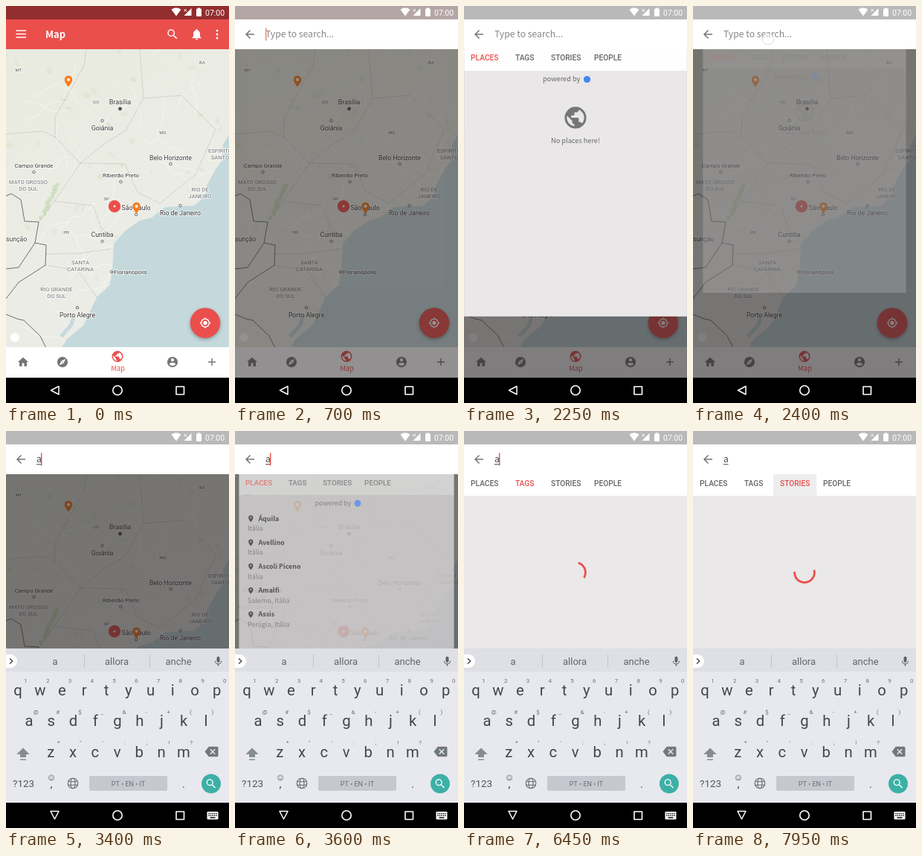
An HTML page with a canvas for the animation above (8 s loop, 300x533 px).

```html
<!DOCTYPE html>
<html lang="en">
<head>
<meta charset="utf-8">
<title>Map search</title>
<style>
html, body { margin: 0; width: 100%; height: 100%; overflow: hidden; background: #000; }
canvas { display: block; width: 300px; height: 533px; }
</style>
</head>
<body>
<canvas id="stage"></canvas>
<script>
const W = 300, H = 533, LOOP = 8000;
const cv = document.getElementById('stage');
const dpr = window.devicePixelRatio || 1;
cv.width = W * dpr;
cv.height = H * dpr;
const c = cv.getContext('2d');

const SANS = '"Noto Sans CJK JP", "Noto Sans CJK SC", "Noto Sans CJK", "Noto Sans", sans-serif';
const ROBO = 'Roboto, "Liberation Sans", sans-serif';
const RED = '#ea4f4c', GREY = '#757575', SHEET = '#eae8e9', INK = '#43464c', SEA = '#c5d9dd';

const ICONS = {
  search: 'M15.5 14h-.79l-.28-.27A6.47 6.47 0 0 0 16 9.5 6.5 6.5 0 1 0 9.5 16c1.61 0 3.09-.59 4.23-1.57l.27.28v.79l5 4.99L20.49 19l-4.99-5zm-6 0a4.5 4.5 0 1 1 0-9 4.5 4.5 0 0 1 0 9z',
  bell: 'M12 22a2 2 0 0 0 2-2h-4a2 2 0 0 0 2 2zm6-6v-5c0-3.07-1.64-5.64-4.5-6.32V4a1.5 1.5 0 0 0-3 0v.68C7.63 5.36 6 7.92 6 11v5l-2 2v1h16v-1z',
  home: 'M10 20v-6h4v6h5v-8h3L12 3 2 12h3v8z',
  compass: 'M12 10.9a1.1 1.1 0 1 0 0 2.2 1.1 1.1 0 0 0 0-2.2zM12 2a10 10 0 1 0 0 20 10 10 0 0 0 0-20zm2.19 12.19L6 18l3.81-8.19L18 6z',
  globe: 'M12 2a10 10 0 1 0 0 20 10 10 0 0 0 0-20zm-1 17.93A8 8 0 0 1 4.21 10.21L9 15v1c0 1.1.9 2 2 2zm6.9-2.54c-.26-.81-1-1.39-1.9-1.39h-1v-3c0-.55-.45-1-1-1H8v-2h2c.55 0 1-.45 1-1V7h2c1.1 0 2-.9 2-2v-.41a8 8 0 0 1 2.9 12.8z',
  user: 'M12 2a10 10 0 1 0 0 20 10 10 0 0 0 0-20zm0 3a3 3 0 1 1 0 6 3 3 0 0 1 0-6zm0 14.2c-2.5 0-4.71-1.28-6-3.22.03-1.99 4-3.08 6-3.08s5.97 1.09 6 3.08c-1.29 1.94-3.5 3.22-6 3.22z',
  plus: 'M19 13h-6v6h-2v-6H5v-2h6V5h2v6h6z',
  locate: 'M12 8a4 4 0 1 0 0 8 4 4 0 0 0 0-8zm8.94 3A9 9 0 0 0 13 3.06V1h-2v2.06A9 9 0 0 0 3.06 11H1v2h2.06A9 9 0 0 0 11 20.94V23h2v-2.06A9 9 0 0 0 20.94 13H23v-2zM12 19a7 7 0 1 1 0-14 7 7 0 0 1 0 14z',
  back: 'M20 11H7.83l5.59-5.59L12 4l-8 8 8 8 1.41-1.41L7.83 13H20z',
  pin: 'M12 2a7 7 0 0 0-7 7c0 5.25 7 13 7 13s7-7.75 7-13a7 7 0 0 0-7-7zm0 9.5a2.5 2.5 0 0 1 0-5 2.5 2.5 0 0 1 0 5z',
  mic: 'M12 14a3 3 0 0 0 3-3V5a3 3 0 0 0-6 0v6a3 3 0 0 0 3 3zm5.3-3a5.3 5.3 0 0 1-10.6 0H5c0 3.41 2.72 6.23 6 6.72V21h2v-3.28c3.28-.48 6-3.3 6-6.72z',
  erase: 'M22 3H7L0 12l7 9h15a2 2 0 0 0 2-2V5a2 2 0 0 0-2-2zm-3 12.6L17.6 17 14 13.4 10.4 17 9 15.6l3.6-3.6L9 8.4 10.4 7l3.6 3.6L17.6 7 19 8.4 15.4 12z',
  wifi: 'M12 21 24 5C20 2 16 1 12 1S4 2 0 5z',
  signal: 'M2 22h20V2z',
  shift: 'M12 3 1 14h6v5h10v-5h6zM7 22h10v2H7z'
};
for (const k in ICONS) ICONS[k] = new Path2D(ICONS[k]);

const clamp = v => Math.max(0, Math.min(1, v));
const ramp = (t, a, b) => clamp((t - a) / (b - a));
const out = p => 1 - (1 - p) ** 3;

// cubic-bezier(.4, 0, .2, 1)
function ease(x) {
  let lo = 0, hi = 1, s = x;
  for (let i = 0; i < 18; i++) {
    s = (lo + hi) / 2;
    const bx = 1.2 * s * (1 - s) ** 2 + 0.6 * s * s * (1 - s) + s ** 3;
    if (bx < x) lo = s; else hi = s;
  }
  return 3 * s * s * (1 - s) + s ** 3;
}

function rect(x, y, w, h, color) {
  c.fillStyle = color;
  c.fillRect(x, y, w, h);
}
function disc(x, y, r, fill, stroke, lw = 1) {
  c.beginPath();
  c.arc(x, y, r, 0, 7);
  if (fill) { c.fillStyle = fill; c.fill(); }
  if (stroke) { c.strokeStyle = stroke; c.lineWidth = lw; c.stroke(); }
}
function round(x, y, w, h, r, color) {
  c.beginPath();
  c.roundRect(x, y, w, h, r);
  c.fillStyle = color;
  c.fill();
}
function icon(name, x, y, size, color) {
  c.save();
  c.translate(x - size / 2, y - size / 2);
  c.scale(size / 24, size / 24);
  c.fillStyle = color;
  c.fill(ICONS[name], 'evenodd');
  c.restore();
}
function text(s, x, y, size, color, font = ROBO, align = 'left', weight = 400) {
  c.font = `${weight} ${size}px ${font}`;
  c.textAlign = align;
  c.fillStyle = color;
  c.fillText(s, x, y);
}
function line(pts, color, lw) {
  c.beginPath();
  pts.forEach(p => c.lineTo(...p));
  c.strokeStyle = color;
  c.lineWidth = lw;
  c.stroke();
}

// Key points of the map
const COAST = [[301, 171], [292, 186], [291, 207], [282, 219], [270, 241], [268, 255], [253, 268], [214, 270],
  [196, 284], [180, 288], [160, 302], [145, 319], [143, 356], [139, 375], [122, 391], [104, 429], [82, 447], [74, 460]];
const FRONTIERS = [
  [[0, 255], [7, 252], [20, 260], [25, 289], [44, 290], [39, 318], [17, 351], [0, 353]],
  [[39, 318], [54, 321], [53, 348], [17, 371], [0, 393]],
  [[0, 414], [15, 420], [24, 422], [46, 443], [54, 459]]
];
const STATES = [
  [[0, 172], [49, 168], [66, 176], [100, 211], [65, 262], [44, 290]],
  [[66, 176], [66, 150], [105, 80], [108, 58]],
  [[100, 211], [134, 184], [161, 167], [185, 124], [180, 58]],
  [[100, 211], [160, 212], [177, 250], [207, 265], [255, 226], [282, 166], [236, 120], [185, 124]],
  [[65, 262], [117, 268], [129, 300], [150, 311]],
  [[54, 333], [100, 332], [141, 326]],
  [[53, 348], [97, 355], [122, 391]]
];
// name, x, dot y, label baseline offset, size
const CITIES = [
  ['Brasília', 153.5, 138, -6, 9], ['Goiânia', 129.5, 154, 13, 8.8], ['Belo Horizonte', 221.5, 212, -5, 8.7],
  ['Campo Grande', 37.5, 223, -6, 7.8], ['Ribeirão Preto', 154.5, 236, -6, 7.8], ['São Paulo', 175, 280, -6, 8.7],
  ['Rio de Janeiro', 234.5, 268, 13, 8.7], ['Curitiba', 129.5, 316, -6, 8.7], ['Porto Alegre', 96, 405, 13, 8.7]
];
const REGIONS = [['MATO GROSSO', 'DO SUL', 30, 239], ['ESPÍRITO', 'SANTO', 288, 197], ['RIO DE', 'JANEIRO', 261, 249],
  ['SANTA', 'CATARINA', 100, 347], ['RIO GRANDE', 'DO SUL', 68, 383]];
const CODES = [['MT', 17, 88], ['GO', 121, 131], ['BA', 264, 78], ['MG', 211, 172], ['SP', 135, 261], ['PR', 81, 305.5]];

function drawLand() {
  rect(0, 58, W, 400, SEA);
  c.save();
  c.beginPath();
  c.rect(0, 58, W, 400);
  c.clip();
  c.beginPath();
  c.moveTo(301, 50);
  COAST.forEach(p => c.lineTo(...p));
  c.lineTo(-2, 460);
  c.lineTo(-2, 50);
  c.closePath();
  const tint = c.createLinearGradient(0, 58, 140, 300);
  tint.addColorStop(0, '#e8ebdf');
  tint.addColorStop(1, '#ecece6');
  c.fillStyle = tint;
  c.fill();
  c.clip();

  let seed = 11;
  const rnd = () => (seed = seed * 16807 % 2147483647) / 2147483647;
  for (let i = 0; i < 50; i++) {
    c.beginPath();
    c.ellipse(rnd() * 300, 60 + rnd() * 330, 1 + rnd() * 5, 1 + rnd() * 4, rnd() * 3, 0, 7);
    c.fillStyle = `rgba(205,222,185,${0.2 + rnd() * 0.3})`;
    c.fill();
  }
  for (let i = 0; i < 12; i++) disc(66 - i * 1.8 + rnd() * 5, 240 + i * 4, 2 + rnd() * 2, 'rgba(196,217,176,.6)');
  for (let i = 0; i < 40; i++) {
    let x = rnd() * 300, y = 60 + rnd() * 380;
    const dir = rnd() * 6.3, pts = [];
    for (let k = 0; k < 6; k++) {
      pts.push([x, y]);
      const a = dir + (rnd() - 0.5) * 1.4;
      x += Math.cos(a) * 13;
      y += Math.sin(a) * 13;
    }
    line(pts, 'rgba(255,255,255,.6)', 0.8);
  }
  c.setLineDash([2, 1.2]);
  STATES.forEach(p => line(p, 'rgba(160,162,162,.7)', 0.8));
  c.setLineDash([]);
  FRONTIERS.forEach(p => line(p, '#6e706f', 1));
  line([[92, 414], [88, 428], [74, 444]], SEA, 5);
  c.restore();
}

function label(s, x, y, size, color, align = 'center') {
  c.font = `400 ${size}px ${ROBO}`;
  c.textAlign = align;
  c.strokeStyle = 'rgba(255,255,255,.65)';
  c.lineWidth = 2;
  c.strokeText(s, x, y);
  text(s, x, y, size, color, ROBO, align);
}

function drawMap() {
  drawLand();
  c.lineJoin = 'round';
  REGIONS.forEach(([a, b, x, y]) => {
    label(a, x, y, 7.6, '#707374');
    label(b, x, y + 9.3, 7.6, '#707374');
  });
  CODES.forEach(([s, x, y]) => label(s, x, y, 6.2, '#555'));
  label('sunção', 0, 316, 8.7, '#444', 'left');
  CITIES.forEach(([s, x, y, dy, size]) => {
    disc(x, y, 1.7, '#fff', '#555', 0.9);
    label(s, x, y + dy, size, '#383838');
  });
  disc(153.5, 138, 2.4, '#555');
  disc(142, 357, 1.6, '#fff', '#555', 0.9);
  label('Florianópolis', 145, 360, 7.8, '#383838', 'left');
  disc(146, 269, 8.2, RED);
  disc(146, 269, 1.4, '#fff');
  for (const [x, y] of [[84, 101], [175.5, 271]]) {
    icon('pin', x, y, 18, '#fb7a18');
    disc(x, y - 2.2, 2, '#fff');
  }
  disc(12, 445, 6, '#fff');
}

function drawPage() {
  drawMap();
  c.save();
  c.shadowColor = 'rgba(0,0,0,.3)';
  c.shadowBlur = 5 * dpr;
  c.shadowOffsetY = 2 * dpr;
  disc(268, 425.5, 20.3, RED);
  c.restore();
  icon('locate', 268, 425.5, 16, '#fff');

  rect(0, 18, W, 40, RED);
  for (const y of [33, 37.5, 42]) rect(13.5, y - 0.7, 13.5, 1.5, '#fff');
  text('Map', 53, 42.5, 13, '#fff', SANS, 'left', 700);
  icon('search', 224, 38, 18, '#fff');
  icon('bell', 256.5, 38, 18, '#fff');
  for (const y of [33, 38, 43]) disc(284, y, 1.5, '#fff');

  rect(0, 458, W, 41, '#fff');
  ['home', 'compass', 'globe', 'user', 'plus'].forEach((name, i) => {
    const mid = i === 2;
    icon(name, 23 + i * 63.5 - (i % 4 ? 10.5 - (i - 1) * 10.5 : 0) - (mid ? 0 : 0), mid ? 470.5 : 478, mid ? 18 : 17, mid ? RED : GREY);
  });
  text('Map', 150.5, 490, 9.4, RED, SANS, 'center');
}

function drawStatus(dim) {
  const mix = (a, b) => Math.round(a + (b - a) * dim);
  rect(0, 0, W, 18, `rgb(${mix(146, 186)},${mix(46, 185)},${mix(46, 185)})`);
  icon('wifi', 229, 8.5, 13, '#fff');
  icon('signal', 244.5, 8, 12, '#fff');
  line([[239.5, 4], [243, 7.5]], '#fff', 1);
  line([[243, 4], [239.5, 7.5]], '#fff', 1);
  round(256, 3.5, 7, 10.5, 1, '#fff');
  rect(258, 2.5, 3, 2, '#fff');
  text('07:00', 268, 12.8, 10.5, '#fff');
}

function drawNav(typing) {
  rect(0, 499, W, 34, '#000');
  c.save();
  c.translate(65.5, 516);
  if (typing) c.rotate(-Math.PI / 2);
  line([[5.5, -5.5], [5.5, 5.5], [-5, 0], [5.5, -5.5], [5.5, 0]], '#fff', 1.5);
  c.restore();
  disc(150, 516, 6.2, null, '#fff', 1.6);
  c.strokeRect(229, 511, 10.5, 10.5);
  if (typing) {
    round(270.5, 511, 15, 10.5, 1.2, '#fff');
    for (let i = 0; i < 10; i++) rect(272.3 + i % 5 * 2.5, i < 5 ? 513 : 515.6, 1.4, 1.4, '#000');
    rect(274.5, 518.4, 7, 1.4, '#000');
  }
}

const TAGS_AT = 5500, STORIES_AT = 7670;
const TABS = [['PLACES', 9], ['TAGS', 69], ['STORIES', 117], ['PEOPLE', 175]];
const PLACES = [['Áquila', 'Itália'], ['Avellino', 'Itália'], ['Ascoli Piceno', 'Itália'],
  ['Amalfi', 'Salerno, Itália'], ['Assis', 'Perúgia, Itália']];

function spinner(ms) {
  const turn = ms / 1333, u = turn % 1;
  const head = ease(clamp(u * 2)) * 288, tail = ease(clamp(u * 2 - 1)) * 288;
  const base = -60 + turn * 216 + Math.floor(turn) * 288;
  c.beginPath();
  c.arc(150, 190, 13.4, (base + tail) * Math.PI / 180, (base + head + 10) * Math.PI / 180);
  c.strokeStyle = RED;
  c.lineWidth = 2.8;
  c.stroke();
}

function tabRipple(t, start, [name, x]) {
  const p = ramp(t, start, start + 250), fade = 1 - ramp(t, start + 420, start + 750);
  if (!p || !fade) return;
  c.save();
  c.font = `500 10.2px ${ROBO}`;
  const w = c.measureText(name).width;
  c.beginPath();
  c.rect(x - 9, 53, w + 18, 34);
  c.clip();
  disc(x + w / 2, 70, out(p) * 40, `rgba(0,0,0,${0.065 * fade})`);
  c.restore();
}

function drawSheet(t) {
  let p = out(ramp(t, 700, 980));
  if (t > 2250) p = 1 - ramp(t, 2250, 2440);
  if (t > 3500) p = out(ramp(t, 3500, 3820));
  if (!p) return;
  const scale = 0.888 + 0.112 * p;
  const tab = t < TAGS_AT ? 0 : t < STORIES_AT ? 1 : 2;
  c.save();
  c.globalAlpha = p;
  c.translate(150, 58);
  c.scale(scale, scale);
  c.translate(-150, -58);
  rect(0, 87, W, 330, SHEET);
  rect(0, 58, W, 29, '#fff');
  tabRipple(t, 5400, TABS[1]);
  tabRipple(t, 7550, TABS[2]);
  TABS.forEach(([s, x], i) => text(s, x, 73.5, 10.2, i === tab ? RED : '#666', ROBO, 'left', 500));
  if (tab === 0) {
    text('powered by', 106, 101.5, 9.2, '#666', SANS);
    disc(165.5, 98.5, 4.6, '#4285f4');
    if (t > 3400) PLACES.forEach(([name, area], i) => {
      const y = 123 + i * 33.4;
      icon('pin', 16.5, y - 3, 11, '#222');
      text(name, 27, y, 9.2, '#222', SANS, 'left', 700);
      text(area, 12, y + 14, 9.2, '#666', SANS);
    });
    else {
      icon('globe', 150, 150, 35, GREY);
      text('No places here!', 150, 184.5, 9.2, '#686868', SANS, 'center');
    }
  }
  if (tab === 1 && t < 6900) spinner(t - TAGS_AT);
  if (tab === 2) spinner(t - STORIES_AT);
  c.restore();
}

function cursorOn(t) {
  if (t < 2250) return t < 1500 || t >= 2000;
  if (t < 2600) return false;
  return t < 3850 || Math.floor((t - 3900) / 500) % 2 === 1;
}

function drawBar(t) {
  const p = ease(ramp(t, 400, 700));
  if (!p) return;
  c.save();
  c.beginPath();
  c.arc(224, 38, p * 232, 0, 7);
  c.clip();
  rect(0, 18, W, 40, '#fff');
  icon('back', 20, 38, 18, GREY);
  const typed = t >= 3250;
  if (typed) {
    text('a', 41, 42, 12, '#444', SANS);
    rect(41, 44.3, 6.5, 1, '#444');
  } else text('Type to search...', 41, 42, 12.2, '#868686', SANS);
  if (cursorOn(t)) rect(typed ? 47 : 41, 29.5, 1.4, 17, t > 2600 ? RED : '#dd8a68');
  c.restore();
}

function keyRow(keys, hints, x0, base, dx) {
  [...keys].forEach((k, i) => {
    const x = x0 + i * 29.75;
    text(k, x, base, 20.3, INK, ROBO, 'center');
    text(hints[i], x + dx, base - 16.5, 8, '#6c7077', ROBO, 'center');
  });
}

function drawKeyboard(t) {
  const p = out(ramp(t, 2600, 2980));
  if (!p) return;
  c.save();
  c.beginPath();
  c.rect(0, 58, W, 441);
  c.clip();
  c.translate(0, (1 - p) * 208);
  rect(0, 292, W, 207, '#e8e9ee');
  rect(0, 292, W, 31, '#dfe0e5');
  round(-10, 300, 25, 18, 9, '#fff');
  line([[5, 305.5], [8.8, 309], [5, 312.5]], '#444', 1.4);
  ['a', 'allora', 'anche'].forEach((s, i) => text(s, 66 + i * 83, 313.8, 13, '#5f656b', ROBO, 'center'));
  for (const x of [105, 193]) rect(x, 300, 1, 18, '#c3c5ca');
  icon('mic', 285.5, 309.5, 16, '#5b636a');

  keyRow('qwertyuiop', '1234567890', 16, 354.5, 10.5);
  keyRow('asdfghjkl', '@#$_&-+()', 31, 396, 9);
  keyRow('zxcvbnm', '*"\':;!?', 60.3, 437.5, 10.3);
  icon('shift', 23, 432.5, 19, '#858c92');
  icon('erase', 276.5, 430.5, 18, '#70787e');

  text('?123', 9, 478, 13.5, '#50565c');
  disc(61, 465.5, 3.6, null, '#6a757c', 0.8);
  for (const x of [59.7, 62.3]) disc(x, 464.6, 0.6, '#6a757c');
  c.beginPath();
  c.arc(61, 466, 1.8, 0.2, 2.9);
  c.stroke();
  text(',', 61, 479, 15, INK, ROBO, 'center');
  disc(90, 473, 6.8, null, '#5f676d', 1.1);
  c.beginPath();
  c.ellipse(90, 473, 3, 6.8, 0, 0, 7);
  c.stroke();
  for (const y of [470.7, 475.3]) rect(84, y - 0.5, 12, 1, '#5f676d');
  round(112, 463, 105, 20, 2, '#c5c8ce');
  text('PT • EN • IT', 164.5, 476.5, 9, '#697079', ROBO, 'center');
  text('.', 239, 479, 15, INK, ROBO, 'center');
  disc(276, 473.5, 13, '#3db0a6');
  icon('search', 276, 473.5, 17, '#fff');
  c.restore();
}

// x, y, start
const TAPS = [[224, 38, 300], [101, 44, 2270], [31, 390, 3200], [81, 70, 5400], [137, 70, 7550]];

function draw(t) {
  c.setTransform(dpr, 0, 0, dpr, 0, 0);
  const dim = ramp(t, 400, 750);
  drawPage();
  rect(0, 18, W, 481, `rgba(36,32,33,${0.58 * dim})`);
  drawSheet(t);
  if (t < 700) disc(224, 38, out(ramp(t, 300, 500)) * 17, `rgba(255,255,255,${0.25 * (1 - ramp(t, 500, 700))})`);
  drawBar(t);
  drawKeyboard(t);
  drawStatus(dim);
  drawNav(t >= 2600);
  for (const [x, y, start] of TAPS)
    if (t >= start && t < start + 150) disc(x, y, 8, 'rgba(255,255,255,.5)', 'rgba(0,0,0,.13)');
}

const t0 = performance.now();
function tick() {
  draw((performance.now() - t0) % LOOP);
  requestAnimationFrame(tick);
}
tick();
</script>
</body>
</html>
```
